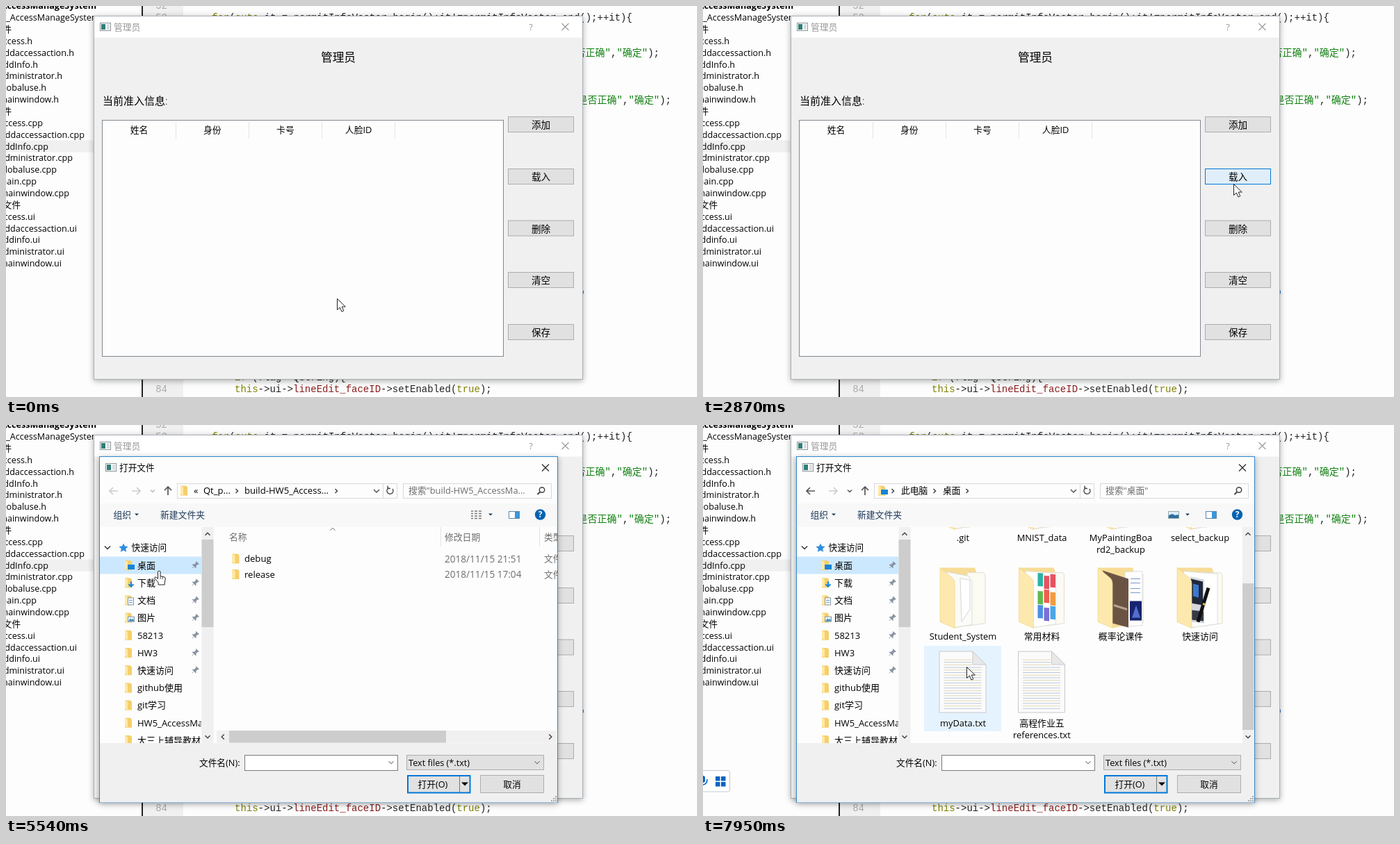
Recreate the animation shown at these times as an HTML page. Size 994x563 px, loop 8000 ms.

```html
<!DOCTYPE html>
<html lang="zh-CN">
<head>
<meta charset="utf-8">
<title>管理员</title>
<style>
html, body { margin: 0; width: 100%; height: 100%; overflow: hidden; background: #fdfdfd; }
svg { display: block; width: 994px; height: 563px; }
text { font-family: 'Open Sans', 'Noto Sans CJK SC', sans-serif; white-space: pre; }
.code { font-family: 'Liberation Mono', 'Noto Sans CJK SC', monospace; }
.song { font-weight: 300; }
.window { filter: drop-shadow(0 2px 4px rgba(0,0,0,.32)); }
.button rect { fill: #e1e1e1; stroke: #adadad; }
.button.hot rect { fill: #e0eefa; stroke: #0078d7; }
</style>
</head>
<body>
<svg id="stage" viewBox="0 0 994 563"></svg>
<script>
const LOOP = 8000, OPEN = 4050, READY = 4250, CLICK = 5430, NAVIGATE = 5720, SCROLL = 6900;
const PAPER = '#fdfdfd', FACE = '#f0f0f0', BLUE = '#0078d7';

const rect = (x, y, w, h, fill, stroke = 'none', extra = '') =>
  `<rect x="${x}" y="${y}" width="${w}" height="${h}" fill="${fill}" stroke="${stroke}" ${extra}/>`;
const path = (d, fill = 'none', stroke = 'none', width = 1) =>
  `<path d="${d}" fill="${fill}" stroke="${stroke}" stroke-width="${width}"/>`;
const group = (id, body, extra = '') => `<g id="${id}" ${extra}>${body}</g>`;
// y is the middle of the line
const text = (x, y, s, { size = 12.8, fill = '#000', anchor = 'start', cls = '', bold = 400 } = {}) =>
  `<text x="${x}" y="${y + size * .37}" font-size="${size}" fill="${fill}" text-anchor="${anchor}"` +
  `${cls ? ` class="${cls}"` : ` font-weight="${bold}"`}>${s}</text>`;
const span = (s, fill) => `<tspan fill="${fill}">${s}</tspan>`;
const chevron = (x, y, turn, color = '#444', r = 3.5, w = 1.5) =>
  `<path d="M${-r} ${-r / 2}L0 ${r / 2} ${r} ${-r / 2}" transform="translate(${x} ${y}) rotate(${turn})" fill="none" stroke="${color}" stroke-width="${w}"/>`;
const triangle = (x, y, r = 3, color = '#1e395b') => path(`M${x - r} ${y - r / 2}h${2 * r}l${-r} ${r}z`, color);
const cross = (x, y, color) => path(`M${x - 5} ${y - 5}l10 10m0 -10l-10 10`, 'none', color, 1.1);
const appIcon = (x, y) => rect(x + .5, y + .5, 15, 11, '#fff', '#8a9296') +
  rect(x + 2, y + 2, 6, 8, '#2f7f78') + rect(x + 10, y + 2, 4, 8, '#d8dde0');

function projectTree() {
  const rows = [['AccessManageSystem', 130], ['_AccessManageSystem.pro', 158], ['头文件', 8],
    ['access.h', 38], ['addaccessaction.h', 98], ['addInfo.h', 46], ['administrator.h', 81],
    ['globaluse.h', 58], ['mainwindow.h', 76], ['源文件', 8], ['access.cpp', 53],
    ['addaccessaction.cpp', 113], ['addInfo.cpp', 61], ['administrator.cpp', 96],
    ['globaluse.cpp', 73], ['main.cpp', 44], ['mainwindow.cpp', 91], ['界面文件', 21],
    ['access.ui', 42], ['addaccessaction.ui', 102], ['addinfo.ui', 49],
    ['administrator.ui', 84], ['mainwindow.ui', 80]];
  return rect(0, 193.5, 195, 17, FACE) + rows.map(([s, right], i) =>
    text(right, -.3 + i * 16.85, s, { size: 12.6, anchor: 'end', bold: i ? 400 : 700 })).join('');
}

function editor() {
  const code = { size: 14, cls: 'code', fill: '#222' }, end = { ...code, anchor: 'end' };
  const number = (y, s) => text(232, y, s, { ...end, fill: '#aaa' });
  const string = s => span(s, '#128012');
  return rect(197, 0, 58, 563, FACE) + rect(195, 0, 2, 563, '#222') +
    number(-1, '52') + number(16, '53') + number(551, '84') +
    text(296, 16, span('for', '#808000') + '(' + span('auto', '#808000') +
      ' it = permitInfoVector.begin();it!=permitInfoVector.end();++it){', code) +
    text(940, 67, string('是否正确"') + ',' + string('"确定"') + ');', end) +
    text(957, 135, string('是否正确"') + ',' + string('"确定"') + ');', end) +
    `<circle cx="827" cy="412" r="4" fill="#1767c0"/>` +
    text(329, 534, span('if', '#808000') + ' (flag==QString){', code) +
    text(329, 551, span('this', '#808000') + '-&gt;ui-&gt;' + span('lineEdit_faceID', '#8a1c1c') +
      '-&gt;setEnabled(' + span('true', '#808000') + ');', code);
}

const buttonTops = [159.5, 234.5, 309, 383.5, 458.5];
function adminWindow() {
  const heads = ['姓名', '身份', '卡号', '人脸ID'];
  const buttons = ['添加', '载入', '删除', '清空', '保存'];
  return `<g class="window">${rect(126.5, 14.5, 703, 523, FACE, '#a9b0b8')}</g>` +
    rect(127, 15, 702, 30.5, '#fff') + appIcon(135, 24) +
    text(155, 30, '管理员', { fill: '#999' }) +
    text(755, 30, '?', { fill: '#999', anchor: 'middle', size: 13 }) + cross(804.5, 30, '#999') +
    text(478, 74, '管理员', { size: 16.7, anchor: 'middle' }) +
    text(139, 136, '当前准入信息:', { size: 15, cls: 'song' }) +
    rect(138.5, 164.5, 577, 340, PAPER, '#828790') +
    heads.map((s, i) => text(191.5 + i * 105.2, 178, s, { anchor: 'middle' }) +
      rect(244 + i * 105, 166, 1, 25, '#e5e5e5')).join('') +
    buttons.map((s, i) => `<g class="button">${rect(722.5, buttonTops[i], 94, 22, '')}` +
      text(769.5, buttonTops[i] + 11.5, s, { size: 13.6, anchor: 'middle', cls: 'song' }) + '</g>').join('');
}

const folder = (x, y) => path(`M${x} ${y - 7}h8l2 2v12h-10z`, '#f5cf6b') + path(`M${x} ${y - 7}l4 2v12l-4 -2z`, '#ffe9a6');
const page = (x, y) => path(`M${x} ${y - 7.5}h8l4 4v11h-12z`, '#fff', '#999');
const pin = y => `<g transform="translate(272 ${y}) rotate(45)">` +
  path('M-2.5 -5h5v1h-1v4l2 2h-7l2 -2v-4h-1zM0 2v4', '#8792a0', '#8792a0', .8) + '</g>';
const star = path('M169 170.5l2 4 4.6 .5 -3.4 3.2 1 4.6 -4.2 -2.3 -4.2 2.3 1 -4.6 -3.4 -3.2 4.6 -.5z', '#2f8fdd');

const places = ['桌面', '下载', '文档', '图片', '58213', 'HW3', '快速访问', 'github使用', 'git学习', 'HW5_AccessManage', '大三上辅导教材'];
const rowY = i => 202 + i * 25.2;

function placeIcon(i) {
  const y = rowY(i);
  const badge = [
    rect(175, y - 1, 10, 7, '#1683d8'),
    path(`M180 ${y - 2}v7m-3.5 -3l3.5 3.5 3.5 -3.5`, 'none', '#1683d8', 2),
    rect(175.5, y - 3.5, 8, 10, '#fff', '#8796a5') + path(`M177 ${y}h5m-5 3h5`, 'none', '#5d92c0'),
    rect(175.5, y - 1.5, 9, 7, '#eaf5ff', '#8796a5') + path(`M176 ${y + 5}l3 -4 2 2 2 -2 1 4z`, '#3b8ab8')
  ];
  return folder(171, y) + (badge[i] || '');
}

function sidebar() {
  return `<g clip-path="url(#nav)">` +
    rect(135, 147, 146, 311, PAPER) +
    group('rootBar', rect(135, 164, 146, 25, '#d9d9d9')) +
    group('placeBar', rect(135, 189.5, 146, 25, '#cce8ff')) +
    group('hoverBar', rect(135, 189.5, 146, 25, '#e5f3ff')) +
    text(180.5, 176.5, '快速访问', { size: 12.7 }) +
    places.map((s, i) => text(189, rowY(i), s, { size: 13 }) + (i < 7 ? pin(rowY(i)) : '')).join('') +
    group('pages', places.map((s, i) => page(170.5, rowY(i))).join('')) +
    group('placeIcons', star + chevron(146, 176.5, 0, '#333', 4) + places.map((s, i) => placeIcon(i)).join('')) +
    '</g>' + rect(281.5, 147, 17, 311, FACE) + rect(281.5, 165, 17, 126, '#cdcdcd', 'none', 'id="navThumb"') +
    chevron(290, 157, 180) + chevron(290, 449, 0);
}

function detailsList() {
  const gray = { fill: '#6d6d6d' };
  const row = (y, name, date) => folder(325.5, y) + text(343, y, name, { size: 13.1 }) +
    text(631, y, date, { ...gray, size: 13.6 }) + text(774, y, '文件夹', gray);
  return `<g clip-path="url(#list)">` + text(321, 161, '名称', gray) + text(631, 161, '修改日期', gray) +
    text(774, 161, '类型', gray) + rect(625, 147, 1, 28, '#e5e5e5') + rect(767, 147, 1, 28, '#e5e5e5') +
    chevron(470, 150, 180, '#666', 3.5, 1) +
    row(192.5, 'debug', '2018/11/15 21:51') + row(215, 'release', '2018/11/15 17:04') + '</g>' +
    rect(303, 440, 489, 17.5, FACE) + rect(321, 440, 312, 17.5, '#cdcdcd') +
    chevron(312, 449, 90) + chevron(783, 449, -90);
}

const columns = [374, 487.5, 601, 715], cellTops = [51, 193, 318];
const tileColors = ['#28b4a4', '#e65360', '#e65360', '#62b84f', '#ef5d4f', '#f29b3f', '#4d8fe0', '#7a6fd6', '#4aa6e8'];
// folder contents are drawn relative to the icon's top left corner
const contents = {
  papers: path('M10 7l32 6 5 8v62l-25 4z', '#fbfbf8', '#ddd') +
    path('M30 16l14 3v42l-12 18z', '#fff', '#d5d5d5'),
  chart: path('M10 6l44 3v73l-32 5z', '#fff', '#e4e4e4') + `<g transform="skewY(5)">` +
    tileColors.map((c, i) =>
      rect(28 + i % 3 * 9, 6 + (i / 3 | 0) * 23 + i % 2 * 3, 7.5, 19, c)).join('') + '</g>',
  slides: path('M40 7l25 -1v78l-25 2z', '#fff', '#ddd') + path('M8 5l37 12v70l-23 -6z', '#6b5344') +
    path('M24 55l19 6', 'none', '#b5a18c', 3) + path('M48 17h14m-14 6h14m-14 8h14m-14 6h14', 'none', '#7899c5') +
    rect(47, 49, 17, 28, '#17246f') + path('M50 73l6 -18 6 18z', '#536ecb'),
  pen: path('M10 6l49 4v72l-37 5z', '#fff', '#ddd') +
    path('M20 14l20 4v63l-20 -2z', '#d5d8de') + path('M21 17l17 4v34l-17 -3z', '#20283c') +
    path('M24 24l8 2v18l-8 -2z', '#3c78d0') + path('M22 62l17 2v14l-17 -2z', '#343b48') +
    path('M46 30L31 79', 'none', '#111', 5) + path('M38 53l4 1', 'none', '#d2b45a', 3)
};
const bigFolder = (x, y, kind) => `<g transform="translate(${x - 34} ${y})">` +
  path('M1 1h50l2 5v76l-31 6z', '#f6dc95') + path('M40 8h24l2 3v70l-26 4z', '#fbfaf3', '#e3dfd0') + contents[kind] +
  path('M1 1l18 15q3 3 3 8v64l-21 -9z', '#fde9ae', '#efd486', .7) + '</g>';
function bigText(x, y) {
  let lines = '';
  for (let i = 0; i < 20; i++)
    lines += path(`M${x - 27} ${y + 12 + i * 3.7}h${i < 3 ? 40 : 54}`, 'none', i % 2 ? '#bcc8d8' : '#e0d8b8');
  return path(`M${x - 33.5} ${y}h48l19 19v69h-67z`, '#fbfbfb', '#c8c8c8') + lines +
    path(`M${x + 14.5} ${y}v19h19z`, '#e8e8e8', '#c8c8c8');
}

function desktopList() {
  const label = (col, y, s) => text(columns[col], y, s, { size: 12.9, anchor: 'middle' });
  const first = ['.git', 'MNIST_data', 'MyPaintingBoa', 'select_backup'];
  const second = [['Student_System', 'papers'], ['常用材料', 'chart'], ['概率论课件', 'slides'], ['快速访问', 'pen']];
  return `<g clip-path="url(#list)">` + group('grid',
    rect(0, 0, 111, 123, '#e5f3ff', 'none', 'id="cell"') +
    first.map((s, i) => bigFolder(columns[i], 62.5, 'papers') + label(i, 162, s)).join('') + label(2, 179, 'rd2_backup') +
    second.map(([s, kind], i) => bigFolder(columns[i], 204.5, kind) + label(i, 304, s)).join('') +
    bigText(columns[0] - .5, 326) + label(0, 429, 'myData.txt') +
    bigText(columns[1] - .5, 326) + label(1, 429, '高程作业五') + label(1, 446, 'references.txt')) + '</g>' +
    rect(776, 147, 16.5, 311, FACE) + rect(776, 165, 16.5, 211, '#cdcdcd', 'none', 'id="listThumb"') +
    chevron(784, 157, 180) + chevron(784, 449, 0);
}

const arrow = (x, y, turn, color) => `<g transform="translate(${x} ${y}) rotate(${turn})">` +
  path('M6 0h-12m5 -5l-5 5 5 5', 'none', color, 1.7) + '</g>';

const frameParts = () => // controls present once the dialog is painted
  arrow(187, 95, 180, '#ccc') + arrow(233, 95, 90, '#555') +
  rect(246.5, 84.5, 316, 21, PAPER, '#d9d9d9') + rect(542, 85, 1, 20, '#d9d9d9') + chevron(533, 95, 0, '#555', 4) +
  path('M556 92a4.5 4.5 0 1 1 -5 -1.5m-2 -3v4h4', 'none', '#555', 1.5) +
  rect(571.5, 84.5, 213, 21, PAPER, '#d9d9d9') + path('M768.5 96l-4 4', 'none', '#444', 2) +
  `<circle cx="771" cy="93.5" r="3.7" fill="none" stroke="#444" stroke-width="1.5"/>` +
  text(154.5, 129, '组织', { fill: '#1e395b' }) + triangle(188, 129) +
  text(222, 129, '新建文件夹', { fill: '#1e395b' }) + triangle(697, 129) +
  text(278, 486, '文件名(N):', { size: 12.7 }) +
  rect(343.5, 475.5, 220, 22, '#fff', '#7a7a7a') + chevron(554, 486, 0, '#444', 3.5, 1) +
  rect(576.5, 475.5, 197, 21, '#e1e1e1', '#adadad') + text(579, 486, 'Text files (*.txt)', { size: 12.7 }) +
  chevron(764, 486, 0, '#444', 3.5, 1) +
  rect(578, 505, 89.5, 24.5, '#e1e1e1', BLUE, 'stroke-width="2"') + rect(652, 506, 1, 23, '#777') +
  text(614, 517, '打开(O)', { anchor: 'middle', size: 12.7 }) + triangle(660, 517, 5, '#000') +
  rect(682.5, 504.5, 91, 25, '#e1e1e1', '#adadad') + text(728, 517, '取消', { anchor: 'middle', size: 12.7 }) +
  [[0, 0], [3, 0], [6, 0], [3, -3], [6, -3], [6, -6]].map(([x, y]) => rect(784 + x, 540 + y, 2, 2, '#aaa')).join('');

const blanks = () => rect(277.5, 477, 60, 17, PAPER) + rect(343.5, 475, 220.5, 22.5, PAPER) +
  rect(576, 475, 199, 22, PAPER) + rect(576, 502.5, 93.5, 28, PAPER) + rect(681.5, 502.5, 93.5, 28, PAPER) +
  rect(774, 525, 19, 18, PAPER);

const projectBar = () => arrow(155, 95, 0, '#ccc') + chevron(211, 95, 0, '#bbb', 3) + folder(251, 94.5) +
  text(270, 94, '«', { size: 13 }) + text(284, 94.5, 'Qt_p...', { size: 13 }) + chevron(332, 95, -90, '#444', 3) +
  text(343, 94.5, 'build-HW5_Access...', { size: 13.1 }) + chevron(475, 95, -90, '#444', 3) +
  text(579, 94.5, '搜索"build-HW5_AccessMa...', { fill: '#6d6d6d', size: 12.8 }) +
  [0, 1, 2, 3].map(i => path(`M669 ${124 + i * 3.5}h3m2 0h4m2 0h4`, 'none', '#777', 1.5)).join('');

const desktopBar = () => arrow(155, 95, 0, '#555') + chevron(211, 95, 0, '#555', 3) + folder(252, 94.5) + rect(256, 93, 10, 7, '#1683d8') +
  [273, 333, 380].map(x => chevron(x, 95, -90, '#444', 3)).join('') +
  text(285, 94.5, '此电脑') + text(345, 94.5, '桌面') + text(579, 94.5, '搜索"桌面"', { fill: '#6d6d6d' }) +
  rect(669.5, 124.5, 15, 10, '#dceefb', '#9aa') + path('M670 134v-4l5 -2 4 2 5 -1v5z', '#2d6f9f');

function dialog() {
  return `<g class="window">${rect(134.5, 45.5, 659, 498, PAPER, '#2f89d0')}</g>` +
    appIcon(143, 55) + text(163, 61, '打开文件', { size: 12.7 }) + cross(776, 61.5, '#222') +
    rect(135, 113, 658, 33.5, '#f7f8f7') + rect(135, 458, 658, 85.5, FACE) +
    rect(723.5, 124.5, 15, 10, '#fff', '#5b87ad') + rect(732, 125, 6, 9, '#3a96dd') +
    `<circle cx="768.5" cy="129" r="7.7" fill="#0063b1"/>` +
    text(768.5, 129, '?', { fill: '#fff', anchor: 'middle', size: 12, bold: 700 }) +
    sidebar() + group('details', detailsList()) + group('desktop', desktopList()) +
    group('blanks', blanks()) + group('ready', frameParts()) +
    group('projectBar', projectBar()) + group('desktopBar', desktopBar());
}

const inputBar = () => rect(-5, 497.5, 43.5, 30.5, '#fff', '#c3c9d2', 'rx="2"') +
  rect(-3, 505, 6, 10, '#0a63c2', 'none', 'rx="3"') + path('M6 510q0 8 -7 8v3', 'none', '#0a63c2', 1.6) +
  [0, 1, 2, 3].map(i => rect(18 + i % 2 * 8, 506 + (i >> 1) * 8, 6.5, 6.5, '#0a63c2')).join('');

const pointers = () =>
  group('arrow', path('M.5 .5V16.5L4.3 13 7 19 9.8 17.8 7.2 12H12.3Z', '#fff', '#222')) +
  group('hand', path('M-1.5 1q1.8 -2 3.5 0v6.5l6 1.5q1.5 .5 1.2 3l-1 5v3h-9v-3l-5.5 -6.5q0 -2.5 2.5 -1.2l2.3 2.2z', '#fff', '#222') +
    path('M2 8v4m3 -3.5v3.5', 'none', '#222', .8));

const stage = document.getElementById('stage');
stage.innerHTML = `<defs><clipPath id="nav">${rect(135, 147, 146, 311, '#000')}</clipPath>
  <clipPath id="list">${rect(300, 147, 493, 311, '#000')}</clipPath></defs>` +
  rect(0, 0, 994, 563, PAPER) + projectTree() + editor() + adminWindow() +
  group('dialog', dialog()) + group('inputBar', inputBar()) + group('pointer', pointers());

const part = Object.fromEntries([...stage.querySelectorAll('[id]')].map(el => [el.id, el]));
const buttons = [...stage.querySelectorAll('.button')];
const show = (id, on) => part[id].style.display = on ? '' : 'none';
const set = (id, attrs) => Object.entries(attrs).forEach(([k, v]) => part[id].setAttribute(k, v));

const route = [[0, 476, 421], [150, 476, 421], [1000, 740, 183], [1700, 740, 183], [2700, 763, 256],
  [3400, 763, 256], [4050, 672, 263], [4400, 672, 263], [5350, 220, 210], [5800, 220, 210],
  [6700, 558, 307], [7100, 558, 307], [7850, 379, 348], [LOOP, 379, 348]];
function pointerAt(t) {
  const i = route.findIndex(stop => stop[0] > t);
  const [t0, x0, y0] = route[i - 1], [t1, x1, y1] = route[i];
  const k = (t - t0) / (t1 - t0), e = k * k * (3 - 2 * k);
  return [x0 + (x1 - x0) * e, y0 + (y1 - y0) * e];
}

function draw(t) {
  const [x, y] = pointerAt(t);
  const open = t >= OPEN, ready = t >= READY, browsing = t >= NAVIGATE;
  const overNav = ready && x > 135 && x < 281 && y > 189 && y < 458;

  buttons.forEach((el, i) => {
    const over = x > 722 && x < 817 && y >= buttonTops[i] && y <= buttonTops[i] + 22.5;
    el.classList.toggle('hot', open ? i === 1 && !ready : over);
  });
  show('dialog', open);
  for (const id of ['rootBar', 'pages', 'blanks']) show(id, !ready);
  for (const id of ['placeIcons', 'ready']) show(id, ready);
  show('details', !browsing);
  show('projectBar', ready && !browsing);
  show('desktop', browsing);
  show('desktopBar', browsing);
  show('placeBar', t >= CLICK);
  show('inputBar', open && (t < CLICK || browsing));
  set('navThumb', { height: ready ? 126 : 196 });

  const row = Math.floor((y - 189.4) / 25.2);
  show('hoverBar', overNav && !(row === 0 && t >= CLICK));
  set('hoverBar', { transform: `translate(0 ${row * 25.2})` });

  const shift = t < SCROLL ? 92 : 0;
  set('grid', { transform: `translate(0 ${shift})` });
  set('listThumb', { y: t < SCROLL + 90 ? 165 : 228 });
  const col = columns.findIndex(c => Math.abs(x - c) < 56);
  const line = cellTops.findIndex(top => y - shift >= top && y - shift <= top + 123);
  const hit = col >= 0 && line >= 0 && !(line === 2 && col > 1);
  show('cell', hit);
  if (hit) set('cell', { x: columns[col] - 56, y: cellTops[line] });

  show('hand', overNav);
  show('arrow', !overNav);
  set('pointer', { transform: `translate(${x} ${y})` });
}

function tick() {
  draw(performance.now() % LOOP);
  requestAnimationFrame(tick);
}
tick();
</script>
</body>
</html>
```
